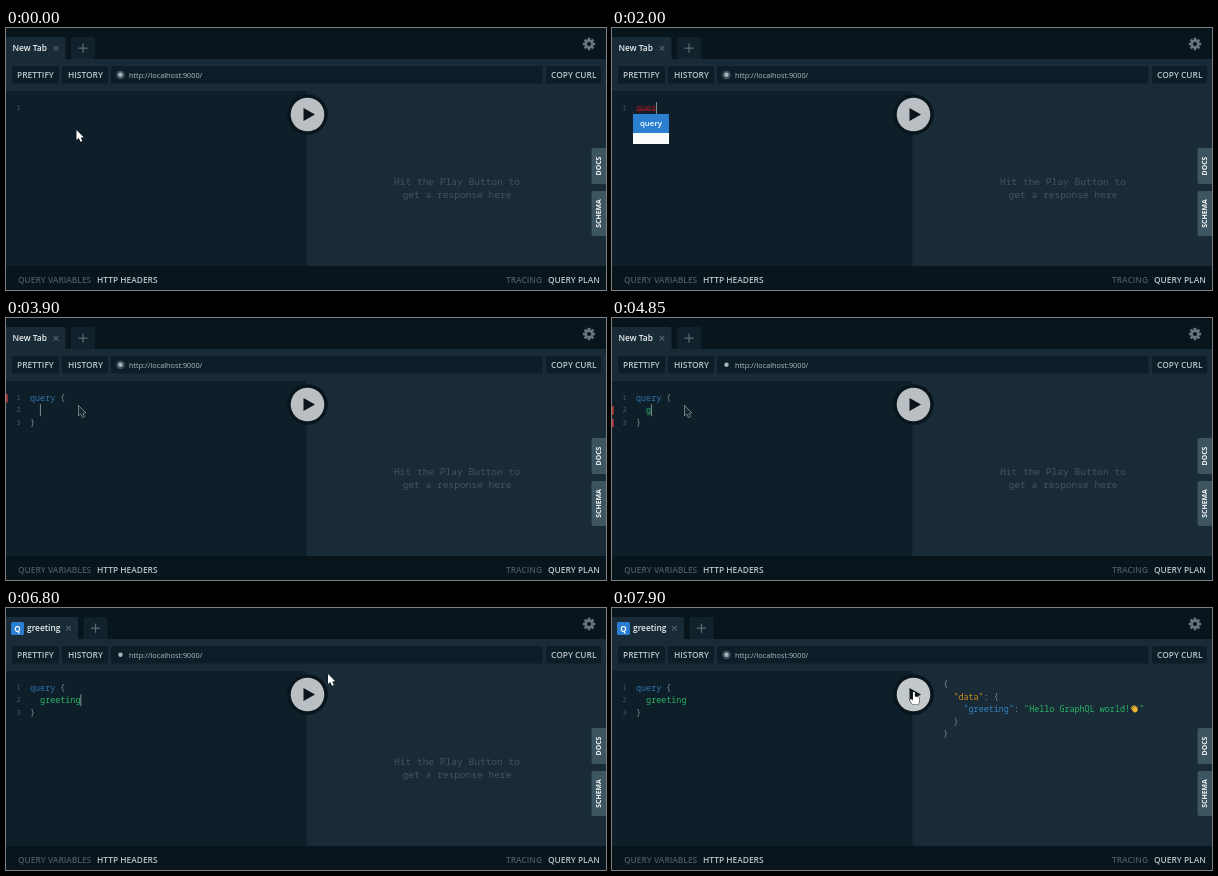
Animation, 600 px wide and 262 px high, one loop 8000 ms. Source, as an HTML page with a canvas:

```html
<!DOCTYPE html>
<html lang="en">
<head>
<meta charset="utf-8">
<title>Query playground</title>
<style>
  html, body { margin: 0; width: 100%; height: 100%; overflow: hidden; background: #09151d; }
  canvas { display: block; width: 600px; height: 262px; }
</style>
</head>
<body>
<canvas id="stage" width="600" height="262"></canvas>
<script>
const ctx = document.getElementById('stage').getContext('2d');
const LOOP = 8000;
const BLINK = 530;
const SANS = '"Open Sans", "Noto Sans", sans-serif';
const MONO = '"Noto Sans Mono", "DejaVu Sans Mono", monospace';
const LABEL = `600 8.4px ${SANS}`;
const CODE = `8.42px ${MONO}`;
const CHAR = 5.05;
const COLOR = {
  bar: '#09151d', pane: '#182b36', editor: '#0e1f29', button: '#0c1e28',
  text: '#bdc5c9', dim: '#44545d', punct: '#7d8990',
  blue: '#2f74ad', green: '#2bb466', orange: '#cf8a1c', red: '#a51624'
};

// Moments at which something is typed, clicked or accepted.
const KEYS = [160, 1400, 1650, 1800, 1950, 2100, 3000, 3550, 3820, 4850, 4950, 5500];
const WORD_KEYS = [1400, 1650, 1800, 1950, 2100];

const between = (t, a, b) => t >= a && t < b;
const ease = p => p < 0 ? 0 : p > 1 ? 1 : p * p * (3 - 2 * p);

function rect(x, y, w, h, fill, r = 0) {
  ctx.fillStyle = fill;
  ctx.beginPath();
  ctx.roundRect(x, y, w, h, r);
  ctx.fill();
}

function circle(x, y, r, fill) {
  ctx.fillStyle = fill;
  ctx.beginPath();
  ctx.arc(x, y, r, 0, Math.PI * 2);
  ctx.fill();
}

function text(str, x, y, fill, font = LABEL, align = 'left') {
  ctx.font = font;
  ctx.fillStyle = fill;
  ctx.textAlign = align;
  ctx.textBaseline = 'alphabetic';
  ctx.fillText(str, x, y);
}

function polygon(points, fill, stroke) {
  ctx.beginPath();
  points.forEach(([x, y]) => ctx.lineTo(x, y));
  ctx.closePath();
  if (stroke) {
    ctx.strokeStyle = stroke;
    ctx.lineWidth = 1;
    ctx.stroke();
  }
  ctx.fillStyle = fill;
  ctx.fill();
}

function cross(x, y, r, color, angle = 0) {
  ctx.save();
  ctx.translate(x, y);
  ctx.rotate(angle);
  rect(-r, -0.6, 2 * r, 1.2, color);
  rect(-0.6, -r, 1.2, 2 * r, color);
  ctx.restore();
}

function gear(x, y) {
  ctx.save();
  ctx.translate(x, y);
  for (let i = 0; i < 8; i++) {
    rect(-1.3, -6.2, 2.6, 3, '#68767e', 0.4);
    ctx.rotate(Math.PI / 4);
  }
  circle(0, 0, 4.6, '#68767e');
  circle(0, 0, 2.1, COLOR.bar);
  ctx.restore();
}

function tabs(t) {
  const named = t >= 4950;
  const title = t < 4950 ? 'New Tab' : t < 5550 ? 'gr' : 'greeting';
  const closeX = { 'New Tab': 50, gr: 38.5, greeting: 62.5 }[title];
  const edge = closeX + 9.5;
  rect(0, 9, edge, 23, COLOR.pane, [0, 2, 0, 0]);
  rect(edge + 5.5, 9, 24, 22, '#12222c', [2, 2, 0, 0]);
  if (named) {
    rect(5, 14, 13, 13, '#2a7ed2', 1.5);
    text('Q', 11.5, 23.5, '#fff', `700 8px ${SANS}`, 'center');
  }
  text(title, named ? 21 : 6.5, 23, '#eef1f2');
  cross(closeX, 20.2, 3.3, '#4f5f68', Math.PI / 4);
  cross(edge + 17.5, 20.2, 4.6, '#5d6c74');
}

function toolbar(t) {
  rect(6, 38, 47, 17.5, COLOR.button, 1.5);
  rect(56, 38, 46, 17.5, COLOR.button, 1.5);
  rect(105, 38, 431.5, 17.5, COLOR.button, 1.5);
  rect(540, 38, 55, 17.5, COLOR.button, 1.5);
  text('PRETTIFY', 11, 49.7, COLOR.text);
  text('HISTORY', 62, 49.7, COLOR.text);
  text('COPY CURL', 545, 49.7, COLOR.text);
  text('http://localhost:9000/', 123, 49.6, '#b4bdc2', `7.3px ${SANS}`);
  // The schema poll pulses every two seconds.
  if ((t + 200) % 2000 < 480) circle(114.5, 46.8, 4.4, '#3b505b');
  circle(114.5, 46.8, 2.2, '#a9b4b9');
}

function sideTab(label, y, h) {
  rect(585.5, y, 14.5, h, '#3d5560', [2, 0, 0, 2]);
  ctx.save();
  ctx.translate(595.3, y + h / 2);
  ctx.rotate(-Math.PI / 2);
  text(label, 0, 0, '#f2f5f6', `700 6.9px ${SANS}`, 'center');
  ctx.restore();
}

function frame(t) {
  rect(0, 0, 600, 262, COLOR.bar);
  tabs(t);
  gear(583, 16);
  rect(0, 31, 600, 207, COLOR.pane);
  toolbar(t);
  rect(0, 63, 300.5, 175, COLOR.editor);
  text('QUERY VARIABLES', 12, 254.7, '#4b5961');
  text('HTTP HEADERS', 91, 254.7, COLOR.text);
  text('TRACING', 500, 254.7, '#4b5961');
  text('QUERY PLAN', 542, 254.7, COLOR.text);
}

const lineY = n => 70.5 + 12.4 * n;

function code(str, x, line, color) {
  text(str, x, lineY(line), color, CODE);
}

function lineNumber(n) {
  text(String(n), 12.6, lineY(n) - 1, '#4a5a63', `7px ${MONO}`, 'center');
}

function caret(t, line, col) {
  const last = KEYS.filter(k => k <= t).pop();
  if (last === undefined || t >= 7500) return;
  if (Math.floor((t - last) / BLINK) % 2 === 0) {
    rect(23.8 + col * CHAR, lineY(line) - 9, 1, 12, '#7f8c93');
  }
}

function menu(x, y, w, h, label) {
  rect(x, y, w, h, '#fafbfb');
  rect(x, y, w, 19, '#2b7fd0');
  text(label, x + w / 2, y + 12.3, '#fff', `600 7.9px ${SANS}`, 'center');
}

function mark(line) {
  rect(0, lineY(line) - 7, 1.6, 8.5, '#c63a3a');
}

function editor(t) {
  const typed = 'query'.slice(0, WORD_KEYS.filter(k => k <= t).length);
  const opened = t >= 3820;
  const field = t < 4850 ? '' : t < 4950 ? 'g' : t < 5500 ? 'gr' : 'greeting';

  lineNumber(1);
  code(typed, 24, 1, typed === 'query' ? COLOR.blue : COLOR.red);
  if (between(t, 1400, 2100)) {
    rect(24, 81.5, typed.length * CHAR, 0.8, COLOR.red);
  }
  if (opened) {
    lineNumber(2);
    lineNumber(3);
    code('{', 24 + 6 * CHAR, 1, COLOR.punct);
    code(field, 24 + 2 * CHAR, 2, COLOR.green);
    code('}', 24, 3, COLOR.punct);
    caret(t, 2, 2 + field.length);
  } else {
    if (t >= 3550) code('{}', 24 + 6 * CHAR, 1, COLOR.punct);
    caret(t, 1, t >= 3550 ? 7 : t >= 3000 ? 6 : typed.length);
  }

  if (between(t, 2600, 4380)) mark(1);
  if (between(t, 4380, 5350)) {
    mark(2);
    mark(3);
  }
  if (between(t, 1450, 2100)) menu(21, 86, 36, t < 1700 ? 49 : 30, 'query');
  if (between(t, 4900, 5500)) menu(31, 98.5, 47, t < 4950 ? 41 : 30, 'greeting');
}

function wave(x, y) {
  ctx.save();
  ctx.translate(x, y);
  ctx.rotate(-0.65);
  rect(-2.5, -1.2, 5, 4.6, '#f2b632', 1.8);
  for (let i = 0; i < 4; i++) {
    rect(-2.5 + i * 1.3, -4 + Math.abs(i - 1.5) * 0.5, 1.1, 4, '#f2b632', 0.5);
  }
  rect(2, -0.5, 2, 1.3, '#dc9420', 0.6);
  ctx.restore();
}

function response(t) {
  if (t < 7800) {
    const font = `9.55px ${MONO}`;
    text('Hit the Play Button to', 451, 157, '#45555e', font, 'center');
    text('get a response here', 451, 170.3, '#45555e', font, 'center');
    return;
  }
  const put = (str, col, line, color) =>
    text(str, 331.3 + col * CHAR, 66.6 + 12.5 * line, color, CODE);
  put('{', 0, 1, COLOR.punct);
  put('"data"', 2, 2, COLOR.orange);
  put(': {', 8, 2, COLOR.punct);
  put('"greeting"', 4, 3, '#3585c2');
  put(':', 14, 3, COLOR.punct);
  put('"Hello GraphQL world!', 16, 3, COLOR.green);
  wave(522.5, 101);
  put('"', 38.8, 3, COLOR.green);
  put('}', 2, 4, COLOR.punct);
  put('}', 0, 5, COLOR.punct);
}

function playButton(t) {
  circle(301.5, 86.5, 20.3, COLOR.bar);
  circle(301.5, 86.5, 16.8, t >= 6950 ? '#c3c8ca' : '#b9bfc2');
  polygon([[297.5, 80], [309, 86.5], [297.5, 93]], '#0b141a');
}

function arrow(x, y, fill, stroke) {
  const shape = [[0, 0], [0, 10], [2.3, 8], [4, 11.8], [5.8, 11], [4.2, 7.4], [7.2, 7.2]];
  polygon(shape.map(([dx, dy]) => [x + dx, y + dy]), fill, stroke);
}

function hand(x, y) {
  const shape = [[0, 0], [1.7, 0], [1.9, 4.4], [5.8, 5.4], [6.4, 7], [5.5, 12.5],
                 [-0.5, 12.5], [-3.2, 8], [-2.2, 7], [0, 8.6]];
  polygon(shape.map(([dx, dy]) => [x + dx, y + dy]), '#fff', '#20282c');
}

function pointer(t) {
  if (between(t, 400, 3750)) return;
  if (t < 400) {
    const p = ease((t - 50) / 150);
    arrow(70.5 + 2 * p, 102 - 14 * p, '#fff', '#10181d');
  } else if (t < 6550) {
    arrow(72.5, 87.5, '#1a2830', '#c3cbcf');
  } else if (t < 6800) {
    const p = ease((t - 6530) / 250);
    arrow(72.5 + 249.5 * p, 87.5 - 21.5 * p, '#fff', '#10181d');
  } else {
    const p = ease((t - 6800) / 150);
    const x = 322 - 21 * p, y = 66 + 18 * p;
    if (p > 0.5) hand(x, y);
    else arrow(x, y, '#fff', '#10181d');
  }
}

function draw(t) {
  frame(t);
  response(t);
  editor(t);
  playButton(t);
  sideTab('DOCS', 120, 36);
  sideTab('SCHEMA', 163, 45);
  pointer(t);
}

const start = performance.now();
function tick() {
  draw((performance.now() - start) % LOOP);
  requestAnimationFrame(tick);
}
tick();
</script>
</body>
</html>
```
